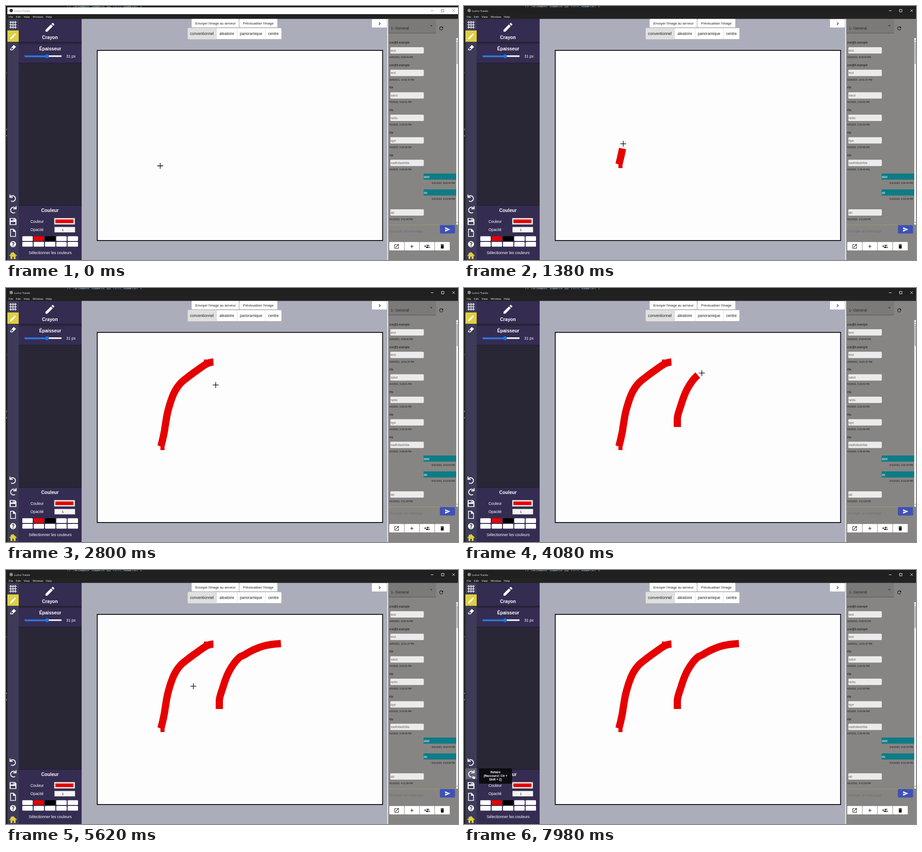
These frames come from a looping animation (998 px wide and 561 px high, 8000 ms). An HTML page:

```html
<!DOCTYPE html>
<html lang="fr">
<head>
<meta charset="utf-8">
<title>Dessin</title>
<style>
html, body { margin: 0; width: 100%; height: 100%; overflow: hidden; background: #1e1e1e; }
svg { display: block; width: 100vw; height: 100vh; }
text { font-family: "Liberation Sans", Arial, sans-serif; white-space: pre; }
.ui { font-family: "Open Sans", "Noto Sans", sans-serif; }
.code { font-family: "DejaVu Sans Mono", monospace; }
</style>
</head>
<body>
<svg id="stage" viewBox="0 0 998 561" xmlns="http://www.w3.org/2000/svg"></svg>
<script>
const LOOP = 8000, LAG = 60, RED = '#e60000';
const stage = document.getElementById('stage');
const out = [];

const rect = (x, y, w, h, fill, more = '') =>
  out.push(`<rect x="${x}" y="${y}" width="${w}" height="${h}" fill="${fill}" ${more}/>`);
const text = (x, y, s, size, fill, more = '') =>
  out.push(`<text x="${x}" y="${y}" font-size="${size}" fill="${fill}" ${more}>${s}</text>`);
const path = (d, more) => out.push(`<path d="${d}" ${more}/>`);
const line = (d, color, width, more = '') =>
  path(d, `fill="none" stroke="${color}" stroke-width="${width}" ${more}`);
// 24-unit icon centred on (cx, cy)
const icon = (cx, cy, size, d, fill) => path(d,
  `fill="${fill}" fill-rule="evenodd" transform="translate(${cx - size / 2} ${cy - size / 2}) scale(${size / 24})"`);
const MID = 'text-anchor="middle"', BOLD = 'font-weight="700"', END = 'text-anchor="end"';

const ICON = {
  edit: 'M3 17.25V21h3.75L17.81 9.94l-3.75-3.75L3 17.25zM20.71 7.04a1 1 0 0 0 0-1.41l-2.34-2.34a1 1 0 0 0-1.41 0l-1.83 1.83 3.75 3.75 1.83-1.83z',
  eraser: 'M14.5 3L22 9.500 10 21H5L1.500 17.500zM8.500 11.500L4.500 16.500 6.500 18.500H9L12.500 15z',
  save: 'M2 2h16l4 4v16H2zM5 4v5h11V4zM12 4.500h2.500v4H12zM5 13v7h14v-7z',
  file: 'M4 1h10l6 6v16H4zM6 3v18h12V9h-6V3z',
  help: 'M12 2a10 10 0 1 0 .01 0zM7.500 9C7.500 3.500 16.500 3.500 16.500 9 16.500 12 13.500 12 13.500 15h-3C10.500 11 13.500 11 13.500 9 13.500 7 10.500 7 10.500 9zM10.500 16.500h3v3h-3z',
  home: 'M12 1L24 12.500 22.500 14 20 11.800V23h-6v-7h-4v7H4V11.800L1.500 14 0 12.500 5 7.800V3h3v2z',
  chevron: 'M10 6L8.590 7.410 13.170 12l-4.580 4.590L10 18l6-6z',
  refresh: 'M17.650 6.350A7.960 7.960 0 0 0 12 4c-4.420 0-7.990 3.580-7.990 8s3.570 8 7.990 8c3.730 0 6.840-2.550 7.730-6h-2.080A5.990 5.990 0 0 1 12 18c-3.310 0-6-2.690-6-6s2.690-6 6-6c1.660 0 3.140.69 4.220 1.780L13 11h7V4z',
  send: 'M2 21L23 12 2 3v7l15 2-15 2z',
  open: 'M19 19H5V5h7V3H5a2 2 0 0 0-2 2v14a2 2 0 0 0 2 2h14a2 2 0 0 0 2-2v-7h-2zM14 3v2h3.590l-9.830 9.830 1.410 1.410L19 6.410V10h2V3z',
  add: 'M19 13h-6v6h-2v-6H5v-2h6V5h2v6h6z',
  group: 'M8 10H5V7H3v3H0v2h3v3h2v-3h3zM18 11a3 3 0 1 0-.9-5.860 5 5 0 0 1 0 5.720zM13 11a3 3 0 1 0-.01 0zM19.620 13.160C20.500 14 21 15 21 16v2h3v-2c0-1.540-2.370-2.490-4.380-2.840zM13 13c-2 0-6 1-6 3v2h12v-2c0-2-4-3-6-3z',
  trash: 'M6 19a2 2 0 0 0 2 2h8a2 2 0 0 0 2-2V7H6zM19 4h-3.500l-1-1h-5l-1 1H5v2h14z'
};

function windowFrame() {
  rect(0, 0, 998, 561, '#1e1e1e');
  text(134, 3.800, '<tspan fill="#b47fb8">if</tspan> (element.gameId == <tspan fill="#569cd6">this</tspan>.gameId) {', 7.700, '#9cc4dc', 'class="code"');
  text(-1, 149, 's', 6, '#b0504c', 'class="code"');
  text(-1, 274, 'v', 6, '#ccc', 'class="code"');
  text(-1, 288, 'v', 6, '#ccc', 'class="code"');
  rect(3, 3, 995, 15.500, '#202020', 'id="bar"');
  out.push('<g id="caption">');
  out.push('<circle cx="11.500" cy="10" r="3.700"/>');
  text(18, 12.500, 'Lumo Tracés', 6, 'currentColor', 'class="ui"');
  line('M938 10.500h6M961.500 7.500h5.500v5.500h-5.500zM985.500 7.500l5.500 5.500M991 7.500l-5.500 5.500', 'currentColor', 0.900);
  out.push('</g>');
  rect(3, 18, 995, 11, '#222');
  [[6, 'File'], [22, 'Edit'], [39, 'View'], [59, 'Window'], [88, 'Help']]
    .forEach(([x, s]) => text(x, 25.500, s, 6.100, '#fff', 'class="ui"'));
}

function toolbar() {
  rect(3, 28.500, 25, 533, '#3d3b58');
  rect(3, 438, 25, 24, '#656379', 'id="hover"');
  line('M10.500 33v17M15.500 33v17M20.500 33v17M7.500 36h16M7.500 41.500h16M7.500 47h16', '#f4f4f4', 1.500);
  rect(3, 54, 25, 25, '#dfcf43');
  icon(15.500, 67, 17, ICON.edit, '#fff');
  icon(15.500, 92, 16, ICON.eraser, '#fff');
  const turn = 'M9.500 421.500A6.300 6.300 0 1 1 11 430.500M8.700 416.500v6h6.300';
  line(turn, '#fff', 1.900);
  line(turn, '#fff', 1.900, 'transform="translate(31 25.500) scale(-1 1)"');
  icon(15.500, 476, 18, ICON.save, '#fff');
  icon(15.500, 501, 19, ICON.file, '#fff');
  icon(15.500, 526, 16, ICON.help, '#fff');
  icon(15.500, 551, 17, ICON.home, '#dfcf43');
}

function toolPanel() {
  rect(28, 28.500, 139, 533, '#292736');
  [[29, 51], [84, 42], [441, 120]].forEach(([y, h]) => {
    rect(28, y, 139, h, '#352c52');
    rect(28, y + h - 0.500, 139, 1, '#1d1a2c');
  });
  rect(28, 440, 139, 1, '#1d1a2c');
  icon(97, 47, 26, ICON.edit, '#fff');
  text(97, 72.500, 'Crayon', 10.200, '#fff', MID + BOLD);
  text(97.500, 98, 'Épaisseur', 10.200, '#fff', MID + BOLD);
  rect(41, 109, 82, 3.600, '#f2f2f2', 'rx="1.800"');
  rect(41, 109, 50, 3.600, '#1a74e8', 'rx="1.800"');
  out.push('<circle cx="90.500" cy="111" r="4.200" fill="#1a74e8"/>');
  text(133, 114, '31 px', 8.500, '#fff');
  text(97, 455, 'Couleur', 10.200, '#fff', MID + BOLD);
  text(54, 478.500, 'Couleur', 8.400, '#fff');
  text(54, 497, 'Opacité', 8.400, '#fff');
  rect(106.500, 468.500, 45.500, 14, '#efefef', 'stroke="#8b8b8b" stroke-width="0.700"');
  rect(109, 471.500, 40, 8, RED);
  rect(107, 488, 45.500, 12, '#f4f4f4', 'stroke="#777" stroke-width="0.500"');
  text(125.500, 497, '1', 8, '#222', MID);
  for (let i = 0; i < 10; i++) {
    const fill = i === 1 ? RED : i === 2 ? '#000' : '#fff';
    rect(36 + i % 5 * 25, i < 5 ? 508.500 : 521, 23, 10.500, fill, 'rx="1.500"');
  }
  text(97.500, 547.500, 'Sélectionner les couleurs', 8.500, '#fff', MID);
}

function workspace() {
  rect(167, 28.500, 676, 533, '#abadbb');
  rect(409.500, 28.500, 105, 19, '#fff', 'rx="1.500" stroke="#999" stroke-width="0.500"');
  rect(515, 28.500, 84.500, 19, '#fff', 'rx="1.500" stroke="#999" stroke-width="0.500"');
  text(418, 41, "Envoyer l'image au serveur", 7.370, '#222');
  text(523.500, 41, "Prévisualiser l'image", 7.370, '#222');
  rect(401, 48.500, 207.500, 25, '#fff', 'rx="2" stroke="#999" stroke-width="0.500"');
  rect(401, 48.500, 64, 25, '#e0e0e0', 'rx="2"');
  line('M465 48.500v25M510.500 48.500v25M572.500 48.500v25', '#ccc', 0.600);
  [[432.500, 'conventionnel'], [487.500, 'aleatoire'], [541, 'panoramique'], [590.500, 'centre']]
    .forEach(([x, s]) => text(x, 63.500, s, 8.500, '#222', MID));
  rect(808, 29, 33, 18.500, '#fff', 'rx="1.500"');
  icon(825, 39, 13, ICON.chevron, '#111');
  rect(201.500, 98, 630, 420, '#fdfdfd', 'stroke="#000" stroke-width="1.800"');
}

function chat() {
  rect(843, 28.500, 155, 533, '#868583');
  rect(841.800, 28.500, 2, 533, '#f1f1f1');
  rect(844, 29, 105.500, 31, '#7b7a79');
  rect(844, 59.500, 105.500, 0.800, '#4b4b4b');
  text(849.500, 52, '1- General', 8.500, '#2b2b2b');
  path('M936.500 42.500h5l-2.500 2.700z', 'fill="#333"');
  icon(961, 49.500, 12.500, ICON.refresh, '#111');

  const bubble = (y, s) => {
    rect(848.500, y, 74, 14, '#ebebeb', 'rx="2"');
    text(849, y + 9.700, s, 7.350, '#676767');
  };
  const stamp = (x, y, s, more) => text(x, y, s, 5.200, '#151515', more);
  const mail = 'zoe@ti.example', user = 'rita';
  [[mail, 'test', '3/29/2021, 9:58:46 PM'], [mail, 'test', '3/29/2021, 10:01:37 PM'],
   [user, 'salut', '4/3/2021, 5:22:01 PM'], [user, 'hello', '4/3/2021, 5:22:03 PM'],
   [user, 'bye', '4/3/2021, 5:22:06 PM'], [user, 'sadfsfadsfda', '4/3/2021, 5:29:49 PM']]
    .forEach(([who, msg, when], i) => {
      const y = 83 + i * 49.700;
      text(846, y, who, 6.300, '#151515');
      bubble(y + 8, msg);
      stamp(846, y + 31.800, when);
    });
  [[370, 'ddd', '4/11/2021, 9:00:44 PM'], [405, 'ds', '4/11/2021, 9:33:39 PM']].forEach(([y, s, when]) => {
    rect(922, y, 72, 13.500, '#0d7c86');
    text(922.500, y + 9.500, s, 7.350, '#fff');
    stamp(991.500, y + 23.200, when, END);
  });
  bubble(449, 'dd');
  stamp(846, 472.800, '4/12/2021, 4:11:28 PM');

  rect(994, 71, 4, 412, '#eee');
  rect(994.500, 79, 3.500, 49, '#b9b9b9');
  path('M994.800 76.500h2.600l-1.300-2zM994.800 477h2.600l-1.300 2z', 'fill="#555"');
  rect(845, 483, 113, 0.900, '#a39c6b');
  text(847, 499.500, 'Envoyer un message', 7.900, '#6f6d68');
  rect(958, 484, 33.500, 18.500, '#3f51b5', 'rx="2"');
  icon(975, 493.500, 13, ICON.send, '#fff');
  ['open', 'add', 'group', 'trash'].forEach((name, i) => {
    const x = 846 + i * 33.600;
    rect(x, 521, 33.200, 19, '#fff', 'rx="1.500" stroke="#777" stroke-width="0.400"');
    icon(x + 16.500, 531, 12.500, ICON[name], '#111');
  });
}

function overlay() {
  line('', RED, 16, 'id="ink" stroke-linejoin="round"');
  rect(341, 345, 9, 13, RED, 'id="blotA"');
  rect(437, 158, 18, 12.500, RED, 'id="blotB"');
  out.push('<g id="tip">');
  rect(33, 438, 73, 34, '#0b0a10', 'rx="2" opacity="0.960"');
  ['Refaire', '(Raccourci: Ctr +', 'Shift + Z)']
    .forEach((s, i) => text(69.500, 449 + i * 8, s, 6.500, '#fff', MID + BOLD));
  out.push('</g><g id="cross">');
  line('M-6.500 0h13M0 -6.500v13', '#fff', 2.200, 'opacity="0.600"');
  line('M-6.500 0h13M0 -6.500v13', '#000', 1.300);
  out.push('</g>');
  path('M0 0v8.800l2-1.900 1.400 3 1.400-.6-1.400-3h2.900z', 'id="arrow" fill="#000" stroke="#fff" stroke-width="0.700"');
  path('M0 .8C0-.4 1.700-.4 1.700.8V4l4 .9c1 .3 1.300.8 1.200 1.800L6.300 11H1.500L-1.700 7c-.6-1 .6-1.600 1.700-.5z',
    'id="hand" fill="#fff" stroke="#000" stroke-width="0.700"');
}

[windowFrame, toolbar, toolPanel, workspace, chat, overlay].forEach(draw => draw());
stage.innerHTML = out.join('');
const el = {};
stage.querySelectorAll('[id]').forEach(node => el[node.id] = node);

// pointer route: time, x, y
const ROUTE = [
  [0, 340.500, 353], [500, 340.500, 353], [700, 342, 350], [1000, 344, 342], [1180, 346, 334],
  [1320, 350, 315], [1380, 351.500, 304.500], [1600, 358, 270], [1780, 370, 234], [1920, 384, 212],
  [2040, 400, 198], [2180, 423, 181], [2300, 444, 167], [2390, 458, 163.500],
  [2560, 459, 172], [2800, 463, 214], [3080, 470, 285], [3240, 471, 307],
  [3300, 471, 307], [3440, 471, 290], [3620, 479, 259], [3800, 490, 229], [3930, 503, 207],
  [4020, 516, 192.500], [4080, 525, 188], [4220, 545, 177], [4360, 567, 168.500],
  [4480, 586, 164.500], [4600, 607, 162.500],
  [4850, 607, 163], [5200, 548, 193], [5620, 414, 256.500], [6000, 250, 348], [6450, 90, 440],
  [6880, 72, 447], [7440, 45, 448], [7680, 19, 451], [8000, 18.500, 451]
];
const STROKES = [[700, 2390], [3300, 4600]];

// slope at key i on one axis, flat at turning points
function slope(i, axis) {
  const a = ROUTE[i - 1], b = ROUTE[i], c = ROUTE[i + 1];
  if (!a || !c || (b[axis] - a[axis]) * (c[axis] - b[axis]) <= 0) return 0;
  return (c[axis] - a[axis]) / (c[0] - a[0]);
}

function pointer(t) {
  let i = 0;
  while (i < ROUTE.length - 2 && t >= ROUTE[i + 1][0]) i++;
  const a = ROUTE[i], b = ROUTE[i + 1], span = b[0] - a[0];
  const u = (t - a[0]) / span, v = 1 - u;
  return [1, 2].map(k =>
    v * v * (1 + 2 * u) * a[k] + u * u * (3 - 2 * u) * b[k] +
    span * u * v * (v * slope(i, k) - u * slope(i + 1, k)));
}

function inkPath(t) {
  let d = '';
  for (const [start, end] of STROKES) {
    const stop = Math.min(t - LAG, end);
    if (stop <= start) continue;
    const pts = [];
    for (let s = start; s < stop; s += 20) pts.push(pointer(s));
    pts.push(pointer(stop));
    d += 'M' + pts.map(p => p.map(n => n.toFixed(2)).join(' ')).join('L');
  }
  return d;
}

const show = (node, on) => node.setAttribute('visibility', on ? 'visible' : 'hidden');

function render(t) {
  const [x, y] = pointer(t), focused = t >= STROKES[0][0];
  el.bar.setAttribute('fill', focused ? '#202020' : '#fff');
  el.caption.setAttribute('color', focused ? '#fff' : '#777');
  el.caption.setAttribute('fill', focused ? '#8b8b8b' : '#333');
  el.ink.setAttribute('d', inkPath(t));
  show(el.blotA, t > STROKES[0][0] + LAG);
  show(el.blotB, t > STROKES[0][1] + LAG);

  const kind = x > 201 ? 'cross' : x > 28 ? 'arrow' : 'hand';
  ['cross', 'arrow', 'hand'].forEach(name => show(el[name], name === kind));
  el[kind].setAttribute('transform', `translate(${x.toFixed(2)} ${y.toFixed(2)})`);
  show(el.hover, kind === 'hand');
  el.tip.setAttribute('opacity', Math.max(0, Math.min(1, (t - 7720) / 150)));
}

const begin = performance.now();
function tick() {
  render((performance.now() - begin) % LOOP);
  requestAnimationFrame(tick);
}
tick();
</script>
</body>
</html>
```
